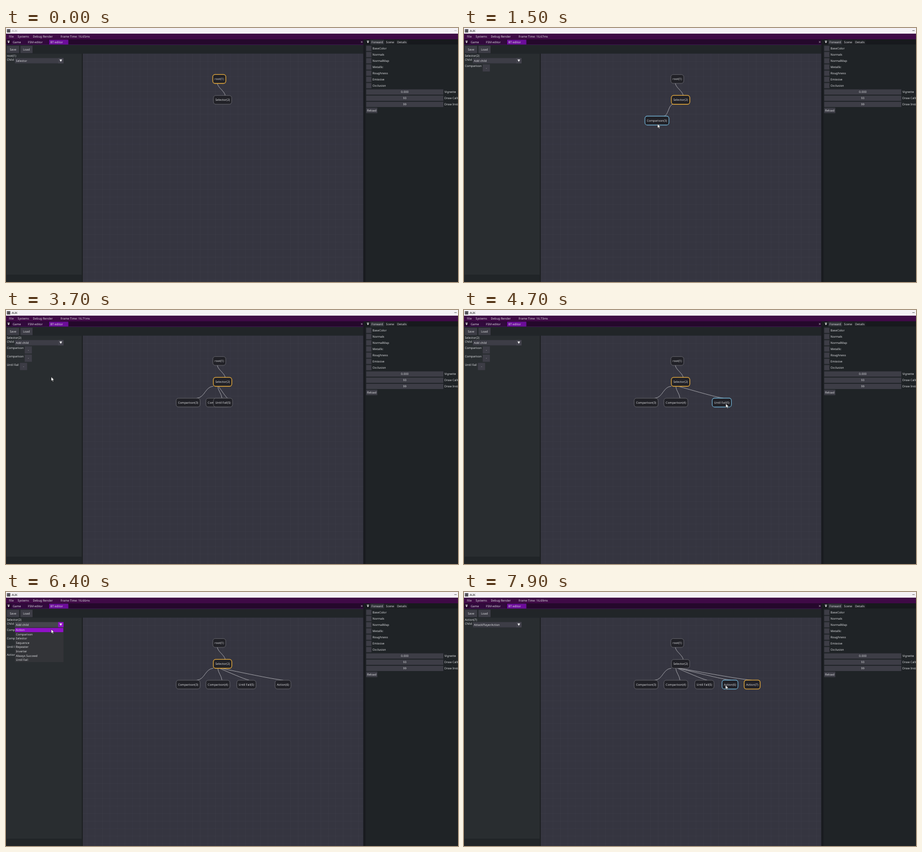
These frames come from a looping animation (800x450 px, 8 s). An HTML page:

```html
<!DOCTYPE html>
<html lang="en">
<head>
<meta charset="utf-8">
<title>Behaviour tree editor</title>
<style>
  html, body { margin: 0; width: 100%; height: 100%; overflow: hidden; background: #1f2326; }
  svg { display: block; width: 800px; height: 450px; }
  text { font-family: "Noto Sans", "Open Sans", sans-serif; font-size: 5.2px; fill: #dcdde0; text-rendering: geometricPrecision; white-space: pre; }
</style>
</head>
<body>
<svg viewBox="0 0 800 450" xmlns="http://www.w3.org/2000/svg">
  <defs>
    <pattern id="grid" x="143.3" y="45.6" width="13.33" height="13.33" patternUnits="userSpaceOnUse">
      <path d="M.25 0V13.33M0 .25H13.33" stroke="#787882" stroke-opacity=".13" stroke-width=".5"/>
    </pattern>
  </defs>
  <g id="base"></g>
  <g id="live"></g>
</svg>
<script>
const LOOP = 8000;
const PURPLE = '#9010c8', FIELD = '#3d3d46';

// Drawing helpers
const rect = (x, y, w, h, fill, extra = '') =>
  `<rect x="${x}" y="${y}" width="${w}" height="${h}" fill="${fill}" ${extra}/>`;
const text = (x, y, s, extra = '') => `<text x="${x}" y="${y}" ${extra}>${s}</text>`;
const mid = (x, y, s) => text(x, y, s, 'text-anchor="middle"');
const line = (d, color, w) => `<path d="${d}" fill="none" stroke="${color}" stroke-width="${w}"/>`;
const button = (x, y, w, h, s) => rect(x, y, w, h, FIELD) + mid(x + w / 2, y + h / 2 + 1.9, s);
const arrow = (x, y, r) => `<path d="M${x - r} ${y - r * .8}h${2 * r}l${-r} ${r * 1.8}z" fill="#eee"/>`;
const tabMark = x => line(`M${x - 2} 22.7h4`, '#eee', .7) + arrow(x, 25.2, 1.9);

const pen = document.createElement('canvas').getContext('2d');
pen.font = '52px "Noto Sans", "Open Sans", sans-serif';
const textWidth = s => pen.measureText(s).width / 10;

const tab = (x, s, fill, pad) =>
  rect(x - 2.4, 20.7, textWidth(s) + pad, 8.8, fill, 'rx="1"') + text(x, 26.9, s);

function drawBase() {
  const checks = ['BaseColor', 'Normals', 'NormalMap', 'Metallic', 'Roughness', 'Emissive', 'Occlusion'];
  const sliders = [['0.000', 'Vignette'], ['93', 'Draw Calls'], ['99', 'Draw Instances']];
  return [
    rect(0, 0, 800, 10, '#f4f1f5'),
    rect(0, 10, 800, 10, '#3f0a46'),
    text(5.3, 17.2, 'File'), text(20.6, 17.2, 'Systems'), text(47.5, 17.2, 'Debug Render'),
    // left dock
    rect(0, 20, 634, 9.5, '#25082c'),
    tab(12, 'Game', '#320a3d', 12), tab(38.7, 'FSM editor', '#320a3d', 12), tab(78.5, 'BT editor', '#6c0d9a', 12),
    rect(0, 29.1, 634, .6, '#5d0f7c'),
    tabMark(4.6),
    line('M628.2 23.4l2.8 2.8m0-2.8l-2.8 2.8', '#ddd', .6),
    rect(0, 29.7, 634, 420.3, '#212528'),
    rect(1, 45.5, 133, 391.5, '#292d30'),
    button(1.5, 31.5, 21.8, 13, 'Save'), button(25.5, 31.5, 21.5, 13, 'Load'),
    rect(136, 45.5, 496.5, 404.5, '#353540'),
    rect(136, 45.5, 496.5, 404.5, 'url(#grid)'),
    rect(134.2, 45.5, 1.6, 404.5, '#1e2124'),
    rect(632.5, 20, 4, 430, '#191b1f'),
    // right dock
    rect(636.5, 20, 163.5, 9.5, '#17191d'),
    tab(647, 'Forward', '#303238', 4.6), tab(672.6, 'Scene', '#1e2024', 4.6), tab(692.3, 'Details', '#1e2024', 4.6),
    rect(636.5, 29.3, 163.5, 420.7, '#1f2326'),
    tabMark(640.6),
    ...checks.map((s, i) => rect(637.5, 31.4 + 11 * i, 9.3, 9.3, FIELD) + text(648.8, 38 + 11 * i, s)),
    ...sliders.map(([v, s], i) => button(637.5, 108.7 + 11 * i, 136.5, 9.3, v) + text(776, 115.2 + 11 * i, s)),
    button(637.5, 141.3, 19.7, 9.5, 'Reload')
  ].join('');
}

// The session is scripted as pointer actions; everything else follows from them.
const ITEMS = ['Action', 'Comparison', 'Selector', 'Sequence', 'Repeater', 'Inverter', 'Always Succeed', 'Until Fail'];
const ROW = 7.52, MENU_TOP = 63.7;
const path = [], nodes = [], menus = [];

const go = (t, x, y) => path.push({ t, x, y });

function addNode(name, born, y, x) {
  const label = `${name}(${nodes.length + 1})`, w = textWidth(label) + 6.2;
  nodes.push({ name, label, born, w, y, x: x ?? 367.3 + w / 2, drags: [] });
}

function openMenu(t) {
  go(t - 40, 97, 58);
  go(t, 97, 58);
  menus.push([t, LOOP]);
}

function pick(t, name) {
  const y = MENU_TOP + ROW * (ITEMS.indexOf(name) + .3);
  go(t - 80, 80, y);
  go(t, 80, y);
  menus[menus.length - 1][1] = t;
  addNode(name, t, 164);
}

// Grabs node i at a small offset, then pulls its centre through the stops.
function drag(i, grab, [dx, dy], ...stops) {
  const n = nodes[i], prev = n.drags.at(-1);
  go(grab, (prev ? prev.x : n.x) + dx, n.y + dy);
  for (const [t, x] of stops) go(t, x + dx, n.y + dy);
  const [end, x] = stops.at(-1);
  n.drags.push({ grab, end, dx, x });
}

addNode('root', 0, 90.3, 377.5);
addNode('Selector', 0, 127.3);
go(100, 780, 324);
go(500, 383, 129);
openMenu(850);
pick(1010, 'Comparison');
drag(2, 1250, [1, 6], [1640, 322.3]);
openMenu(1870);
pick(2000, 'Comparison');
drag(3, 2240, [1, 4], [2400, 375]);
go(2600, 291, 144);
openMenu(2820);
pick(3700, 'Until Fail');
drag(4, 4080, [7, 2], [4700, 456.3], [4950, 425.5]);
openMenu(5320);
go(5500, 99, 102);
pick(5660, 'Action');
drag(5, 5850, [2, 2], [6070, 490.2]);
openMenu(6300);
pick(6480, 'Action');
drag(6, 6720, [2, 1], [7060, 510]);
go(7300, 512, 165);
drag(5, 7500, [-8, 1], [7760, 470.8]);

function pointer(t) {
  const i = path.findIndex(p => p.t > t);
  if (i < 0) return path.at(-1);
  const b = path[i], a = path[i - 1] || b;
  const k = (t - a.t) / (b.t - a.t || 1), e = k * k * (3 - 2 * k);
  return { x: a.x + (b.x - a.x) * e, y: a.y + (b.y - a.y) * e };
}

function place(n, t) {
  const d = n.drags.findLast(d => t >= d.grab);
  return { ...n, x: d ? pointer(Math.min(t, d.end)).x - d.dx : n.x };
}

const selected = t => t < 500 ? 0 : t < 7280 ? 1 : 6;

function link(a, b) {
  const dx = b.x - a.x, left = dx < 0, root = a.name === 'root';
  const top = a.y + 7.8, end = b.y - 7.7;
  const sx = root ? 374 : 376 + dx * (left ? .15 : .04);
  const ex = root ? 388 : b.x + (left ? 6 - .15 * dx : 8 - .07 * dx);
  const w = ex - sx, h = end - top;
  let c;
  if (Math.abs(w) < 15) c = [sx + w * .1, top + h * .38, ex - w * .1, end - h * .38];
  else if (left) c = [sx + w * .5, top + 1, ex - w * .5, end - 1];
  else c = [sx + w * .3, top + h * .32, ex - w * .2, end - h * .12];
  return line(`M${sx} ${top}C${c} ${ex} ${end}`, '#c4c4c9', .7);
}

function drawNode(n, color, w) {
  const g = w / 4;
  return rect(n.x - n.w / 2 - g, n.y - 7.6 - g, n.w + 2 * g, 15.2 + 2 * g, '#212127', `rx="4.2" stroke="${color}" stroke-width="${w}"`)
    + mid(n.x, n.y + 1.8, n.label);
}

function drawGraph(t, p) {
  const shown = nodes.filter(n => t >= n.born).map(n => place(n, t));
  const inside = n => Math.abs(p.x - n.x) < n.w / 2 && Math.abs(p.y - n.y) < 7.9;
  const held = shown.findIndex(n => n.drags.some(d => t >= d.grab && t <= d.end));
  const hover = held >= 0 ? held : shown.findLastIndex(inside);
  const sel = selected(t);
  return shown.slice(1).map((n, i) => link(shown[i ? 1 : 0], n)).join('')
    + shown.map((n, i) => i === sel ? drawNode(n, '#d9a23c', 1.3)
      : i === hover ? drawNode(n, '#72b4d6', 1.1) : drawNode(n, '#808085', .6)).join('');
}

function drawMenu({ x, y }) {
  const row = x > 16 && x < 102 ? Math.floor((y - MENU_TOP) / ROW) : -1;
  return rect(15.8, 62.6, 86, 61.6, '#333438')
    + ITEMS.map((name, i) => (i === row ? rect(16.2, MENU_TOP + ROW * i, 85.2, 7.4, PURPLE) : '')
      + text(17.6, 69.4 + ROW * i, name)).join('');
}

function drawPanel(t, p) {
  const sel = selected(t), open = menus.some(([a, b]) => t >= a && t < b);
  const over = p.x > 16 && p.x < 102 && p.y > 53.5 && p.y < 62.5;
  const value = { root: 'Selector', Selector: 'Add child', Action: 'AttackPlayerAction' }[nodes[sel].name];
  const children = sel === 1 ? nodes.slice(2).filter(n => t >= n.born) : [];
  return text(1.5, 50.6, nodes[sel].label) + text(1.5, 58.3, 'Child')
    + rect(15.8, 53.3, 86, 9.3, open ? '#45454d' : FIELD)
    + rect(92.3, 53.3, 9.5, 9.3, open || over ? PURPLE : '#43434c')
    + arrow(97, 57.7, 2.4)
    + text(17.6, 60, value)
    + children.map((n, i) => {
      const y = 64.4 + 14.65 * i;
      return text(1.5, y + 4.9, n.name) + button(3.4 + textWidth(n.name), y, 12.7, 12.7, '-');
    }).join('')
    + (open ? drawMenu(p) : '');
}

function drawTitle(t) {
  const ink = t < 500 ? '#99979a' : '#151515';
  const ms = 16.65 + Math.floor(t % 5500 / 560) / 100;
  return rect(1.6, 2, 6, 6, '#55535a')
    + text(10, 6.9, 'AUK', `style="fill:${ink}"`)
    + line('M793.5 4.6h4.2', ink, .6)
    + text(96.5, 17.2, `Frame Time: ${ms.toFixed(2)}ms`);
}

const drawPointer = ({ x, y }) =>
  `<path transform="translate(${x} ${y})" d="M0 0V7.2L1.7 5.7 2.9 8.3 4.1 7.8 3 5.2H5.3Z" fill="#fff" stroke="#111" stroke-width=".5"/>`;

const live = document.getElementById('live');
document.getElementById('base').innerHTML = drawBase();
const start = performance.now();

function frame() {
  const t = (performance.now() - start) % LOOP, p = pointer(t);
  live.innerHTML = drawTitle(t) + drawGraph(t, p) + drawPanel(t, p) + (t >= 100 ? drawPointer(p) : '');
  requestAnimationFrame(frame);
}
frame();
</script>
</body>
</html>
```
